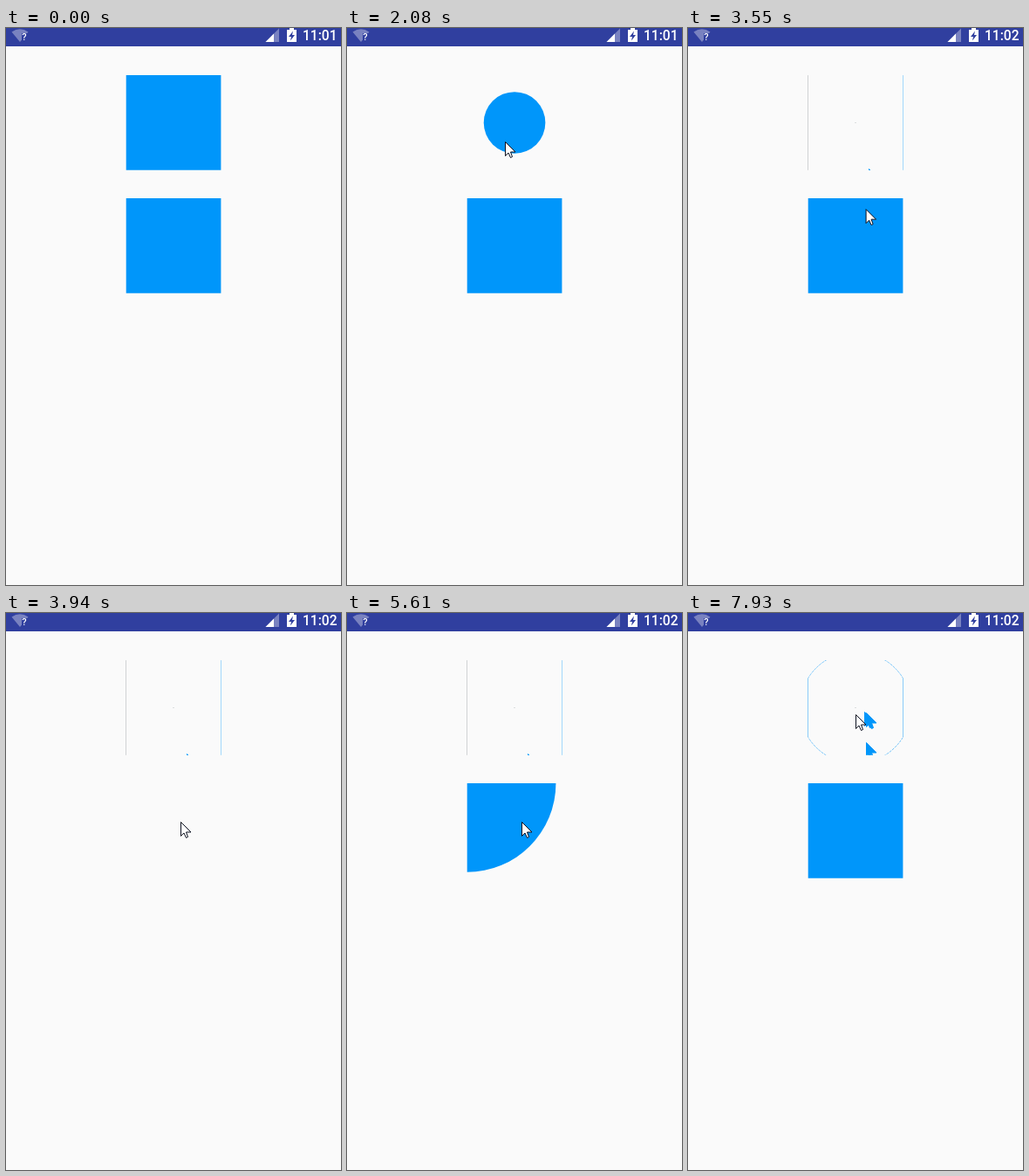
Write an HTML page with a canvas that moves like this. It is 384 px wide and 638 px high and loops after 8000 ms.

```html
<!DOCTYPE html>
<html lang="en">
<head>
<meta charset="utf-8">
<title>Circular reveal</title>
<style>
  html, body { margin: 0; width: 100%; height: 100%; overflow: hidden; background: #fafafa; }
  canvas { display: block; width: 384px; height: 638px; }
</style>
</head>
<body>
<canvas id="stage" width="384" height="638"></canvas>
<script>
const ctx = document.getElementById('stage').getContext('2d');
const LOOP = 8000, BLUE = '#0096fa', BAR = '#303f9f', DIM = '#7982c0';
const LEFT = 137.7, SIZE = 108.7, HALF = SIZE / 2, TOP1 = 54.1, TOP2 = 195.1;
const CX = LEFT + HALF, CY = TOP1 + HALF, CORNER = HALF * Math.SQRT2;
const POPPED = 2650, HIDE_AGAIN = 7780;

const ARROW = new Path2D('M0 0V16L3.5 12.5L6 18L8 17L6 11.5H11.5Z');
const BOLT = new Path2D('M329 3.5L324 10H327L326 14.5L331 8H328Z');
const WIFI = new Path2D('M16 16L6.5 4.5Q16 -2 25.5 4.5Z');

// Pointer moves: each eases from the previous stop
const ENTRY = { x: 309, y: 626 };
const MOVES = [
  { start: 70, end: 670, x: 181, y: 130 },
  { start: 2150, end: 2800, x: 207, y: 161 },
  { start: 2900, end: 3240, x: 207, y: 177 },
  { start: 3320, end: 3790, x: 200, y: 239 },
  { start: 6760, end: 6760, x: 204, y: 148 },
  { start: 6840, end: 6840, x: 202, y: 113 },
  { start: 7780, end: 7780, x: 204, y: 114 },
  { start: 7850, end: 7930, x: 192, y: 116 }
];

const smooth = p => (1 - Math.cos(Math.PI * Math.min(1, Math.max(0, p)))) / 2;
const shrink = age => CORNER * (1 - smooth(age / 1200));

function rect(color, x, y, w, h) {
  ctx.fillStyle = color;
  ctx.fillRect(x, y, w, h);
}

function fill(color, path) {
  ctx.fillStyle = color;
  ctx.fill(path);
}

function circle(x, y, r) {
  const path = new Path2D();
  path.arc(x, y, r, 0, 2 * Math.PI);
  return path;
}

function clipped(top, draw) {
  ctx.save();
  ctx.beginPath();
  ctx.rect(LEFT, top, SIZE, SIZE);
  ctx.clip();
  draw();
  ctx.restore();
}

function arrow({ x, y }, color, line) {
  ctx.save();
  ctx.translate(x + 0.5, y + 0.5);
  fill(color, ARROW);
  ctx.strokeStyle = line;
  ctx.lineWidth = 1;
  ctx.stroke(ARROW);
  ctx.restore();
}

function text(str, size, x, align) {
  ctx.font = `500 ${size}px Roboto, sans-serif`;
  ctx.textAlign = align;
  ctx.fillStyle = '#fff';
  ctx.fillText(str, x, 14);
}

// Right triangle growing left from its upright side
const signal = (x, size) => new Path2D(`M${x} 16V${16 - size}L${x - size} 16Z`);

function statusBar(t) {
  rect(BAR, 0, 0, 384, 21);
  fill(DIM, WIFI);
  rect(BAR, 18, 6, 8, 10);
  text('?', 11, 21, 'center');
  fill(DIM, signal(313, 15.5));
  fill('#fff', signal(307, 9.5));
  rect('#fff', 325, 0, 5, 3);
  rect('#fff', 322, 2, 11, 14);
  fill(BAR, BOLT);
  text(t < 3550 ? '11:01' : '11:02', 15.6, 379.5, 'right');
}

function outline(r) {
  const cut = r < CORNER;
  const reach = Math.min(HALF, Math.sqrt(Math.max(0, r * r - HALF * HALF)));
  rect(cut ? '#8acbf8' : '#d0d3d4', 137, CY - reach, 1, 2 * reach);
  rect(cut ? '#8acbf8' : '#a2d8fb', 246, CY - reach, 1, 2 * reach);
  if (cut) clipped(TOP1, () => {
    ctx.strokeStyle = '#52b5f9';
    ctx.lineWidth = 0.8;
    ctx.setLineDash([3, 1]);
    ctx.stroke(circle(CX, CY, r));
  });
}

function firstSquare(t) {
  if (t < POPPED) {
    const r = t < 1620 ? CORNER + 1 : shrink(t - 1450);
    clipped(TOP1, () => fill(BLUE, circle(CX, CY, r)));
    return;
  }
  outline(t < HIDE_AGAIN ? CORNER : shrink(t - HIDE_AGAIN + 170));
  rect('#dcdedf', 191, 108, 2, 1);
  // The pointer leaves a blue mark at each stop it moves away from
  clipped(TOP1, () => MOVES.forEach((stop, i) => {
    const next = MOVES[i + 1];
    if (stop.end > POPPED && next && t >= next.start) arrow(stop, BLUE, BLUE);
  }));
}

function secondSquare(t) {
  const age = Math.max(0, t - 3975);
  const r = t < 3940 ? 2 * SIZE : (0.006165 * age) ** 2;
  clipped(TOP2, () => fill(BLUE, circle(LEFT, TOP2, r)));
}

function pointer(t) {
  const i = MOVES.findLastIndex(move => move.start <= t);
  if (i < 0) return;
  const from = MOVES[i - 1] || ENTRY, to = MOVES[i];
  const p = t < to.end ? smooth((t - to.start) / (to.end - to.start)) : 1;
  arrow({
    x: from.x + (to.x - from.x) * p,
    y: from.y + (to.y - from.y) * p
  }, '#fff', '#0b1020');
}

function frame(now) {
  const t = now % LOOP;
  rect('#fafafa', 0, 0, 384, 638);
  statusBar(t);
  firstSquare(t);
  secondSquare(t);
  pointer(t);
  requestAnimationFrame(frame);
}
requestAnimationFrame(frame);
</script>
</body>
</html>
```
